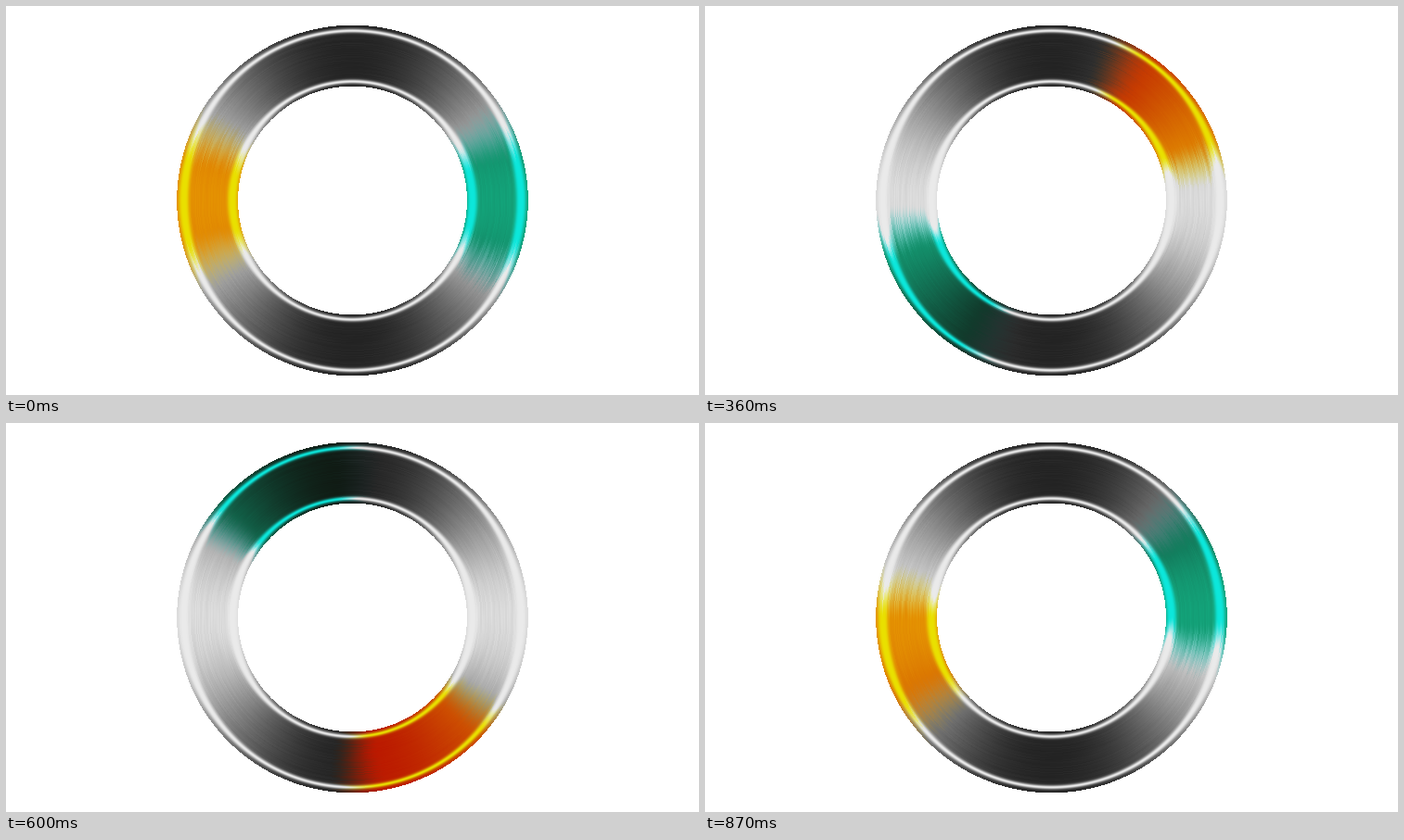
Write an HTML page with a canvas that moves like this. It is 747 by 420 pixels and loops after 0.9 s.

```html
<!DOCTYPE html>
<html lang="en">
<head>
<meta charset="utf-8">
<title>Metal ring</title>
<style>
  html, body { margin: 0; width: 100%; height: 100%; overflow: hidden; background: #fff; }
  canvas { display: block; width: 747px; height: 420px; }
</style>
</head>
<body>
<canvas id="stage" width="747" height="420"></canvas>
<script>
const W = 747, H = 420, CX = W / 2, CY = H / 2, OUTER = 189.3, INNER = 123.4;
const LOOP = 900, STEP = 30, DEG = 180 / Math.PI;
const ctx = document.getElementById('stage').getContext('2d');

const clamp = (v, lo, hi) => Math.min(hi, Math.max(lo, v));
const mix = (a, b, k) => a + (b - a) * k;
const smooth = (a, b, v) => { const k = clamp((v - a) / (b - a), 0, 1); return k * k * (3 - 2 * k); };
const hash = (a, b) => { const s = Math.sin(a * 127.1 + b * 311.7) * 43758.5453; return s - Math.floor(s); };

// Body colour is base + gain * tone; shine colours the bevels; fade shapes each channel's falloff
const WARM = { base: [178, 0, 0], gain: [58, 168, 2], shine: [233, 224, 0], fade: [1, 1.5, 0.7], reach: 40 };
const COOL = { base: [15, 0, 0], gain: [5, 188, 140], shine: [12, 231, 219], fade: [0.8, 1.5, 1.5], reach: 43 };

// Brushed streaks along each circle, -0.5 to 0.5
function streak(r, deg) {
  const ring = Math.floor(r), p = (deg + 180) / 9 + hash(ring, 5), i = Math.floor(p);
  const along = mix(hash(ring, i % 40), hash(ring, (i + 1) % 40), p - i);
  return mix(hash(ring, 77), along, 0.6) - 0.5;
}

// Metal is light at the sides and dark at top and bottom, with a bright bevel along both rims
function metal(x, y) {
  const dx = CX - x - 0.5, dy = CY - y - 0.5, r = Math.hypot(dx, dy);
  if (r > OUTER || r < INNER) return null;
  const deg = Math.atan2(dy, dx) * DEG, cos = Math.abs(dx) / r, side = cos ** 4;
  const n = streak(r, deg);
  const edge = Math.min(Math.abs(r - mix(183.3, 181.7, side)), Math.abs(r - mix(128.5, 129.3, side)));
  const shine = Math.exp(-((edge / mix(2.2, 5.4, side)) ** mix(1.9, 3.4, side)));
  const body = 37 + 182 * cos ** 2.4 + n * mix(8, 15, side);
  return { at: (y * W + x) * 4, deg: deg + n * 4, side, shine, body, tone: mix(body, 234, shine) };
}

const pixels = [];
for (let y = 0; y < H; y++) {
  for (let x = 0; x < W; x++) {
    const p = metal(x, y);
    if (p) pixels.push(p);
  }
}

const image = ctx.createImageData(W, H);
image.data.fill(255);

function draw(turn) {
  for (const p of pixels) {
    let d = Math.abs(p.deg - turn) % 360;
    if (d > 180) d = 360 - d;
    const tint = d < 90 ? WARM : COOL;
    if (d > 90) d = 180 - d;
    const light = p.body / 255;
    const far = mix(tint.reach - 11 * light, mix(32, 22, p.side), p.shine);
    const k = 1 - smooth(far - mix(20, 10, p.shine), far, d);
    for (let c = 0; c < 3; c++) {
      const color = mix(tint.base[c] + tint.gain[c] * light, tint.shine[c], p.shine);
      image.data[p.at + c] = k ? mix(p.tone, color, k ** tint.fade[c]) : p.tone;
    }
  }
  ctx.putImageData(image, 0, 0);
}

const start = performance.now();
let shown = -1;
function tick() {
  const step = Math.floor(((performance.now() - start) % LOOP) / STEP);
  if (step !== shown) {
    shown = step;
    draw(step * 360 * STEP / LOOP);
  }
  requestAnimationFrame(tick);
}
tick();
</script>
</body>
</html>
```
